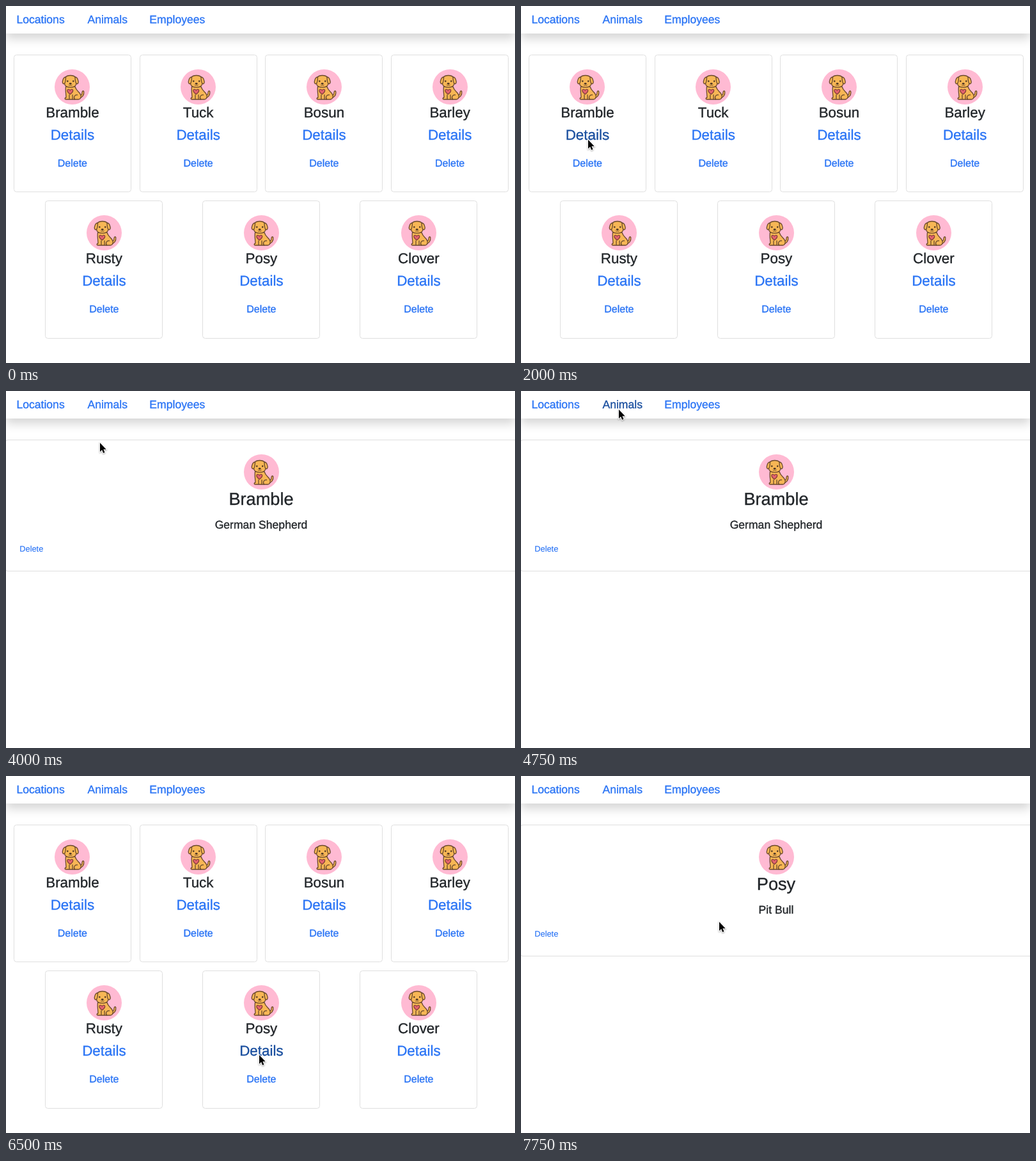
An HTML page that plays this animation: 796 px wide and 558 px high, repeating every 8000 ms.

```html
<!DOCTYPE html>
<html lang="en">
<head>
<meta charset="utf-8">
<title>Animals</title>
<style>
  html, body { margin: 0; width: 100%; height: 100%; overflow: hidden; background: #fff; }
  #stage {
    position: relative; width: 796px; height: 558px; overflow: hidden; background: #fff;
    --link: #2a74f5; --hover: #1a4f9f;
  }
  nav {
    position: absolute; left: 0; top: 0; width: 796px; height: 42.5px;
    background: #fff; box-shadow: 0 8px 16px rgba(0, 0, 0, .17);
  }
  svg { position: absolute; left: 0; top: 0; font-family: "Liberation Sans", Arial, sans-serif; }
  text {
    color: #212529; fill: currentColor; stroke: currentColor; stroke-width: .35px;
    text-rendering: geometricPrecision;
  }

  .box { fill: #fff; stroke: #dfdfdf; }
  .menu, .details, .delete, .small { color: var(--link); }
  .name, .details { font-size: 22.4px; }
  .menu, .breed { font-size: 17.6px; }
  .title { font-size: 27.2px; }
  .delete { font-size: 16px; }
  .small { font-size: 12.8px; stroke-width: .15px; }
  .mid { text-anchor: middle; }

  #list, #first, #second, #cursor, .hot { animation: 8s step-end infinite; }
  #list { animation-name: list; }
  #first { animation-name: first; }
  #second { animation-name: second; }
  #cursor { animation-name: move; }
  .hot.menu { animation-name: hot-menu; }
  .hot.a { animation-name: hot-a; }
  .hot.b { animation-name: hot-b; }

  @keyframes list {
    0%, 62.5% { visibility: visible; }
    34.375%, 84.375%, 100% { visibility: hidden; }
  }
  @keyframes first {
    0%, 62.5%, 100% { visibility: hidden; }
    34.375% { visibility: visible; }
  }
  @keyframes second {
    0% { visibility: hidden; }
    84.375%, 100% { visibility: visible; }
  }
  @keyframes hot-menu {
    0%, 65.625%, 100% { color: var(--link); }
    53.125% { color: var(--hover); }
  }
  @keyframes hot-a {
    0%, 34.375%, 100% { color: var(--link); }
    18.75% { color: var(--hover); }
  }
  @keyframes hot-b {
    0%, 84.375%, 100% { color: var(--link); }
    71.875% { color: var(--hover); }
  }
  @keyframes move {
    0% { transform: translate(-40px, -40px); }
    3.125% { transform: translate(781px, 14px); }
    6.25% { transform: translate(719px, 43px); }
    9.375% { transform: translate(539px, 65px); }
    12.5% { transform: translate(279px, 139px); }
    15.625% { transform: translate(150px, 188px); }
    18.75% { transform: translate(105px, 214px); }
    21.875% { transform: translate(105px, 212px); }
    25% { transform: translate(105px, 209px); }
    34.375% { transform: translate(107px, 209px); }
    46.875% { transform: translate(115px, 198px); }
    50% { transform: translate(147px, 81px); }
    53.125% { transform: translate(150px, 40px); }
    56.25% { transform: translate(152px, 30px); }
    59.375% { transform: translate(153px, 29px); }
    65.625% { transform: translate(174px, 88px); }
    68.75% { transform: translate(284px, 292px); }
    71.875% { transform: translate(375px, 430px); }
    75% { transform: translate(390px, 456px); }
    78.125% { transform: translate(394px, 443px); }
    81.25% { transform: translate(396px, 436px); }
    96.875%, 100% { transform: translate(310px, 228px); }
  }
</style>
</head>
<body>
<div id="stage">
  <nav></nav>
  <svg width="796" height="558" viewBox="0 0 796 558">
    <defs>
      <g id="dog" stroke-linecap="round" stroke-linejoin="round">
        <circle cx="27.5" cy="27.5" r="27.5" fill="#ffbad3"/>
        <g fill="#f7b655" stroke="#6b4a2e" stroke-width="1.3">
          <path d="M38 45C43 44.5 46.5 40.5 45.8 35 45 32.5 43 34 43 36.5 42.8 39.5 41 41.5 38 41.5Z"/>
          <path d="M17.5 27C16.5 33 18 39 18 44 15.5 44.5 15.5 47 18 47H37C41.5 46.5 42.5 41.5 39.5 37.5 37 34.5 33.5 32.5 32 27Z"/>
          <path d="M23 40V46.5M28 40V46.5M31.5 47C29 43.5 31.5 39.500 35.500 40" fill="none"/>
          <path d="M17 12.500C20 8.500 29.500 8.500 32.500 12.500 34 16 35 20 33.500 24 31 29.500 18.500 29.500 16 24 14.500 20 15.500 16 17 12.500Z"/>
          <path d="M17.500 12C14.500 12 13 15 12.300 19 12 22 14 23.500 15.500 22 17.500 19.500 17.300 16 17.500 12Z"/>
          <path d="M32 12C35 12 36.500 15 37.200 19 37.500 22 35.500 23.500 34 22 32 19.500 32.200 16 32 12Z"/>
          <path d="M22 24.500C23 25.800 24.500 25.500 24.700 24 25 25.500 26.500 25.800 27.500 24.500" fill="none" stroke-width=".9"/>
        </g>
        <g fill="#463022">
          <circle cx="20.300" cy="18.500" r="1.200"/>
          <circle cx="29.200" cy="18.500" r="1.200"/>
          <ellipse cx="24.700" cy="22.300" rx="1.900" ry="1.300"/>
        </g>
        <path d="M24.300 39C18.300 35 19.300 31.300 21.800 31.300 23.300 31.300 24.300 32.800 24.300 32.800 24.300 32.800 25.300 31.300 26.800 31.300 29.300 31.300 30.300 35 24.300 39Z"
              fill="#e2626c" stroke="#7a3a35" stroke-width="1.100"/>
      </g>
    </defs>

    <text class="menu" x="16.400" y="27">Locations</text>
    <text class="menu hot" x="127.400" y="27">Animals</text>
    <text class="menu" x="224.300" y="27">Employees</text>

    <g id="list"></g>
    <g id="first"></g>
    <g id="second"></g>

    <g id="cursor">
      <path d="M0 0V14L3.100 11.100 5.200 16 7.500 15 5.400 10.200H9.700Z" stroke="#fff" stroke-width="1.800"
            paint-order="stroke" style="filter: drop-shadow(0 1px 1px rgba(0, 0, 0, .35))"/>
    </g>
  </svg>
</div>
<script>
  const fill = (id, markup) => { document.getElementById(id).innerHTML = markup; };
  const text = (cls, x, y, str) => `<text class="${cls}" x="${x}" y="${y}">${str}</text>`;

  // Edges and pictures snap to whole pixels; text stays fractional.
  const card = (x, y, name, hot = '') => {
    const left = Math.round(x), top = Math.round(y), mid = x + 92;
    return `
      <rect class="box" x="${left + .5}" y="${top + .5}" width="183" height="${Math.round(y + 215.4) - top - 1}" rx="4"/>
      <use href="#dog" x="${Math.round(x + 64.5)}" y="${top + 23}"/>
      ${text('name mid', mid, top + 98, name)}
      ${text('details mid ' + hot, mid, top + 133, 'Details')}
      ${text('delete mid', mid, top + 175, 'Delete')}`;
  };

  const row = (x, step, y, names, hot) =>
    names.map((name, i) => card(x + i * step, y, name, i === hot.index ? hot.cls : '')).join('');

  const page = (name, breed) => `
    <rect class="box" x="-1" y="76.5" width="820" height="205" rx="4"/>
    <use href="#dog" x="372" y="99"/>
    ${text('title mid', 399, 178, name)}
    ${text('breed mid', 399, 215, breed)}
    ${text('small', 21.3, 251, 'Delete')}`;

  fill('list',
    row(11.9, 196.75, 76, ['Bramble', 'Tuck', 'Bosun', 'Barley'], { index: 0, cls: 'hot a' }) +
    row(61.4, 246, 304.3, ['Rusty', 'Posy', 'Clover'], { index: 1, cls: 'hot b' }));
  fill('first', page('Bramble', 'German Shepherd'));
  fill('second', page('Posy', 'Pit Bull'));
</script>
</body>
</html>
```
